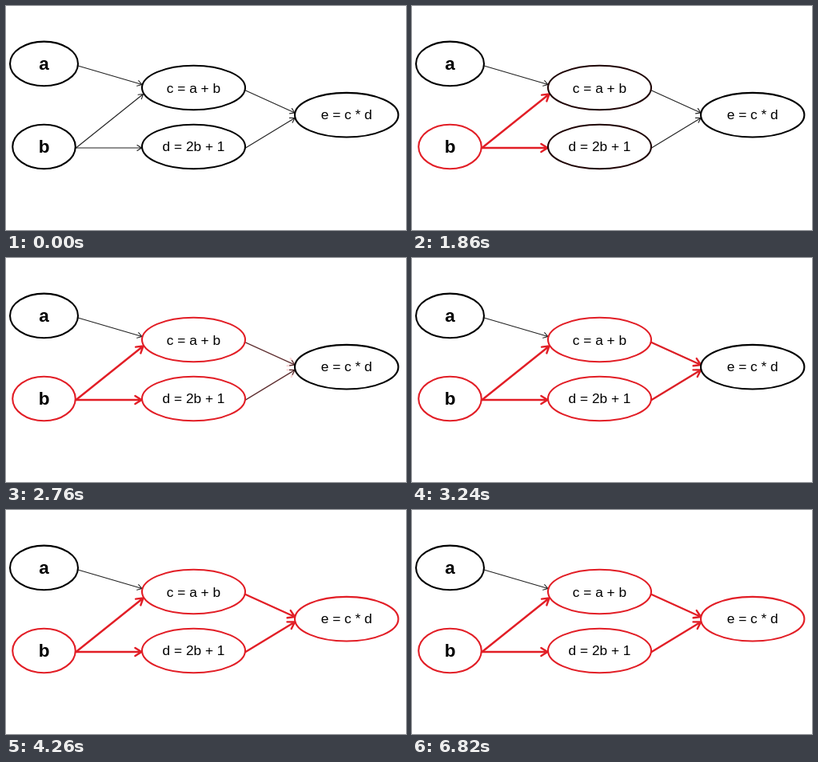
These frames come from a looping animation (500x281 px, 6.84 s). An HTML page with a canvas:

```html
<!DOCTYPE html>
<html lang="en">
<head>
<meta charset="utf-8">
<title>Computation graph</title>
<style>
html, body { margin: 0; width: 100%; height: 100%; overflow: hidden; background: #fff; }
canvas { display: block; width: 500px; height: 281px; }
</style>
</head>
<body>
<canvas id="stage"></canvas>
<script>
const LOOP = 6840, FIRST = 20, STEP = 880, FADE = 600;
const RED = '#e21e26', BLACK = '#000';
const canvas = document.getElementById('stage');
const ctx = canvas.getContext('2d');
const ratio = window.devicePixelRatio || 1;
canvas.width = 500 * ratio;
canvas.height = 281 * ratio;

// step: position in the activation order, -1 stays black
const nodes = [
  { x: 47.5, y: 72.4, rx: 42.5, label: 'a', base: 80, bold: true, step: -1 },
  { x: 47.5, y: 176.5, rx: 39.3, label: 'b', base: 184, bold: true, step: 0 },
  { x: 234.5, y: 102.5, rx: 64.5, label: 'c = a + b', base: 108.5, step: 2 },
  { x: 234.5, y: 176.5, rx: 64.5, label: 'd = 2b + 1', base: 182, step: 2 },
  { x: 425.7, y: 136.7, rx: 64.7, label: 'e = c * d', base: 142.3, step: 4 }
];
const edges = [
  { from: [90, 75], to: [170, 98.5], step: -1 },
  { from: [87.5, 178], to: [171.5, 110.5], step: 1 },
  { from: [87.5, 178], to: [169.5, 178], step: 1 },
  { from: [299.5, 106], to: [361, 134], step: 3 },
  { from: [299.5, 178], to: [361, 140.5], step: 3 }
];

function progress(step, t) {
  if (step < 0) return 0;
  return Math.min(1, Math.max(0, (t - FIRST - step * STEP) / FADE));
}

function ellipse(n, color) {
  ctx.strokeStyle = color;
  ctx.lineWidth = 2.1;
  ctx.beginPath();
  ctx.ellipse(n.x, n.y, n.rx, 27.8, 0, 0, Math.PI * 2);
  ctx.stroke();
}

function arrow({ from, to }, color, width, head) {
  const angle = Math.atan2(to[1] - from[1], to[0] - from[0]);
  ctx.strokeStyle = color;
  ctx.lineWidth = width;
  ctx.beginPath();
  ctx.moveTo(...from);
  ctx.lineTo(...to);
  const barb = side => [
    to[0] - head * Math.cos(angle + side * 0.56),
    to[1] - head * Math.sin(angle + side * 0.56)
  ];
  ctx.moveTo(...barb(1));
  ctx.lineTo(...to);
  ctx.lineTo(...barb(-1));
  ctx.stroke();
}

function withAlpha(alpha, draw) {
  if (!alpha) return;
  ctx.globalAlpha = alpha;
  draw();
  ctx.globalAlpha = 1;
}

function mix(p) {
  return `rgb(${226 * p}, ${30 * p}, ${38 * p})`;
}

function render(t) {
  ctx.setTransform(ratio, 0, 0, ratio, 0, 0);
  ctx.fillStyle = '#fff';
  ctx.fillRect(0, 0, 500, 281);
  ctx.lineCap = 'round';
  ctx.lineJoin = 'round';
  for (const e of edges) {
    const p = progress(e.step, t);
    if (p < 1) arrow(e, '#222', 1.1, 6.5);
    withAlpha(p, () => arrow(e, RED, 2.4, 9.5));
  }
  ctx.textAlign = 'center';
  for (const n of nodes) {
    ellipse(n, mix(progress(n.step, t)));
    ctx.fillStyle = BLACK;
    ctx.font = (n.bold ? 'bold 22.5px' : '17.3px') + ' "Liberation Sans", Arial, sans-serif';
    ctx.fillText(n.label, n.x, n.base);
  }
}

const start = performance.now();
function tick() {
  render((performance.now() - start) % LOOP);
  requestAnimationFrame(tick);
}
tick();
</script>
</body>
</html>
```
